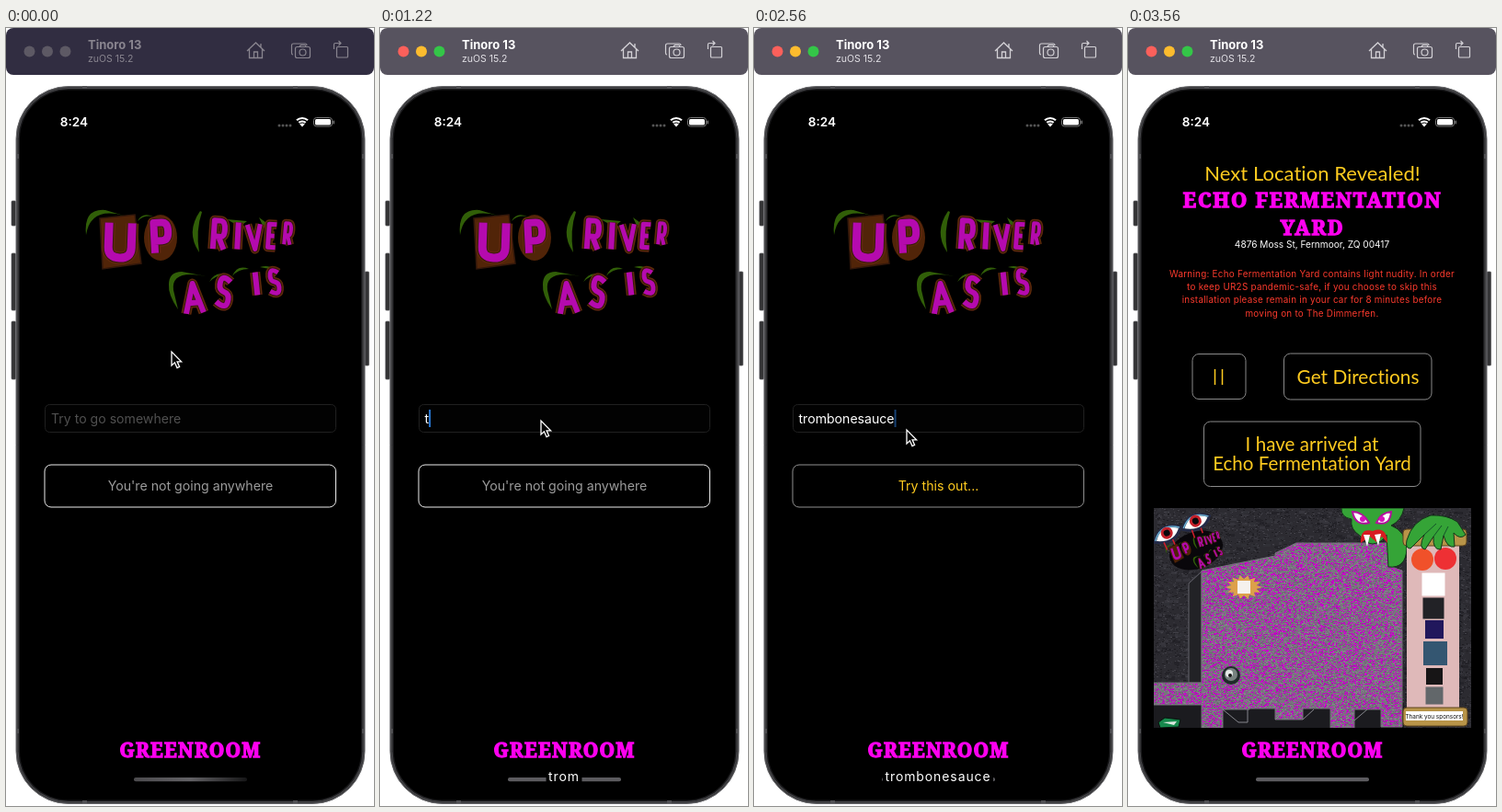
Animation of 400x846 px, one loop 4830 ms. Source, as an HTML page with a canvas:

```html
<!DOCTYPE html>
<html lang="en">
<head>
<meta charset="utf-8">
<title>Phone simulator</title>
<style>
  html, body { margin: 0; width: 100%; height: 100%; overflow: hidden; background: #fff; }
  canvas { display: block; width: 400px; height: 846px; }
</style>
</head>
<body>
<canvas id="stage"></canvas>
<script>
const W = 400, H = 846, LOOP = 4830, FPS = 9;
const SANS = 'Inter, sans-serif', SOFT = 'Lato, sans-serif', DECO = '"Noto Serif", serif';
const MAGENTA = '#ff00f0', GOLD = '#ffcb1f', GREEN = '#35a437';
const WORD = 'trombonesauce';
const dpr = window.devicePixelRatio || 1;

function makeLayer(canvas, w, h) {
  canvas.width = w * dpr;
  canvas.height = h * dpr;
  const g = canvas.getContext('2d');
  g.scale(dpr, dpr);
  return g;
}
const stage = makeLayer(document.getElementById('stage'), W, H);
let c = stage;

// ---------- helpers ----------
function seeded(seed) {
  return () => (seed = (seed * 16807) % 2147483647) / 2147483647;
}
function box(x, y, w, h, r, fill, stroke, lw = 1) {
  c.beginPath();
  c.roundRect(x, y, w, h, r);
  paint(fill, stroke, lw);
}
function disc(x, y, r, fill, ry = r, rot = 0) {
  c.beginPath();
  c.ellipse(x, y, r, ry, rot, 0, 7);
  paint(fill);
}
function shape(d, fill, stroke, lw) {
  paint(fill, stroke, lw, new Path2D(d));
}
function paint(fill, stroke, lw = 1, path) {
  if (fill) { c.fillStyle = fill; path ? c.fill(path) : c.fill(); }
  if (stroke) {
    c.strokeStyle = stroke;
    c.lineWidth = lw;
    path ? c.stroke(path) : c.stroke();
  }
}
function text(s, x, y, font, color, align = 'center', spacing = 0) {
  c.font = font;
  c.letterSpacing = spacing + 'px';
  c.textAlign = align;
  c.fillStyle = color;
  c.fillText(s, x, y);
  return c.measureText(s).width;
}
// slight spacing keeps letters apart instead of joined as ligatures
function soft(s, x, y, size) {
  text(s, x, y, size + 'px ' + SOFT, GOLD, 'center', .05);
}
function deco(s, y, size, spacing) {
  text(s, 200.5, y, '900 ' + size + 'px ' + DECO, MAGENTA, 'center', spacing);
  c.strokeStyle = MAGENTA;
  c.lineWidth = 1.3;
  c.lineJoin = 'miter';
  c.strokeText(s, 200.5, y);
}
function faded(alpha, draw) {
  c.save();
  c.globalAlpha = alpha;
  draw();
  c.restore();
}

// ---------- hand-cut title ----------
const GLYPH = {
  U: 'M0 0V7Q0 10 5 10T10 7V0',
  P: 'M1 10V0H6Q10 0 10 3T6 6H1',
  R: 'M1 10V0H6Q10 0 10 3T6 5.5H1M5 5.5L10 10',
  I: 'M5 0V10',
  V: 'M0 0L5 10L10 0',
  E: 'M10 0H1V10H10M1 5H8',
  A: 'M0 10L5 0L10 10M2 6.5H8',
  S: 'M9 1Q1 -2 1 2.5Q1 4.5 5 5T9 7.5Q9 12 0 9'
};
// letter, centre, size, tilt, stroke
const TITLE = [
  ['U', 124, 231, 25, 38, 2, 9], ['P', 168, 228, 17, 33, -3, 8],
  ['R', 231, 225, 13, 31, 4, 6], ['I', 252, 226, 10, 29, 3, 6],
  ['V', 270, 227, 14, 27, -3, 5], ['E', 289, 226, 9, 25, 4, 5],
  ['R', 306, 224, 7, 23, 5, 4], ['A', 204, 294, 19, 32, -5, 6],
  ['S', 237, 287, 14, 29, 8, 6], ['I', 272, 278, 8, 25, -6, 6],
  ['S', 292, 276, 11, 24, -5, 5]
];
const LEAVES = 'M87 225Q84 196 108 198L128 204Q92 194 87 225Z' +
  'M143 210Q148 200 160 205Q150 203 143 210ZM211 199Q195 222 210 244Q206 220 213 200Z' +
  'M240 208L262 210L254 216ZM275 206L286 214L280 217Z' +
  'M177 279Q177 265 191 265L218 270Q179 262 182 285L187 306Q176 290 177 279Z' +
  'M221 276Q227 265 238 268Q228 269 221 276ZM246 270Q251 257 264 262Q252 262 246 270Z' +
  'M276 260Q286 257 292 263Z';

function title() {
  shape(LEAVES, '#315f08');
  shape('M102 207L140 203L147 256L105 262Z', '#512408', '#32170a', 1.5);
  disc(168, 228, 18, '#512408', 25);
  c.lineJoin = 'round';
  for (const [ch, x, y, w, h, tilt, lw] of TITLE) {
    const p = new Path2D();
    const m = new DOMMatrix().translate(x, y).rotate(tilt).scale(w / 10, h / 10).translate(-5, -5);
    p.addPath(new Path2D(GLYPH[ch]), m);
    paint(null, '#5f290c', lw + 5, p);
    paint(null, '#35190a', lw + 2, p);
    paint(null, '#b50aae', lw, p);
  }
}

// ---------- map picture ----------
function speckle(rand, n, x, y, w, h, colors, size = 1) {
  for (let i = 0; i < n; i++) {
    c.fillStyle = colors[Math.floor(rand() * colors.length)];
    c.fillRect(Math.floor(x + rand() * w), Math.floor(y + rand() * h),
      size + Math.floor(rand() * 2 * size), size);
  }
}
function eye(x, y, rot) {
  c.save();
  c.translate(x, y);
  c.rotate(rot);
  shape('M-16 2Q-3 -17 16 -2Q4 14 -16 2Z', '#fff', '#242b48', 3);
  shape('M-15 1Q-2 -15 15 -2', null, '#6aaed0', 1.5);
  disc(0, -2, 6.5, '#c5202a');
  disc(0, -2, 3.5, '#08080c');
  shape('M-7 6V15M3 7V13', null, '#d31f2b', 1.5);
  c.restore();
}
function monster() {
  shape('M232 522Q231 532 243 534Q241 545 252 552Q259 561 266 561Q276 560 281 551L283 586Q302 588 303 566Q302 547 286 541Q297 536 300 522Z', GREEN, '#14351a', 1);
  shape('M244 526Q255 526 262 538Q247 542 244 526ZM270 538Q275 527 286 526Q285 542 270 538Z', '#fff', '#b40f9d', 2);
  disc(255, 534, 3, '#d512bb');
  disc(276, 534, 3, '#d512bb');
  shape('M253 560Q252 543 266 547Q281 541 282 560L276 553L270 559L263 553Z', '#d81b21');
  shape('M256 551L260 564L263 551ZM268 551L272 563L275 550Z', '#fff');
}
function claws() {
  shape('M303 557Q309 536 329 530Q346 529 358 537L367 551Q361 557 354 549L355 564Q347 566 343 552L340 567Q331 568 332 553L323 567Q315 566 322 551L307 566Q301 566 303 557Z', GREEN, '#14351a', 1);
  shape('M322 551L335 539M332 553L341 541M343 552L348 542', null, '#14532a', 1);
}
function sponsors() {
  box(303, 560, 57, 185, 0, '#dfb9b9');
  box(299, 545, 69, 18, 4, '#b89448', '#5d451d');
  box(299, 739, 70, 20, 4, '#b89448', '#5d451d');
  disc(320, 578, 12, '#f0512a');
  disc(345, 577, 12, '#ee3034');
  // centre x, centre y, side, colour
  [[332, 605, 25, '#fff'], [332, 631, 23, '#222226'], [333, 654, 20, '#21175c'],
   [334, 680, 26, '#345671'], [333, 705, 18, '#171516'], [333, 726, 19, '#62676a']]
    .forEach(([x, y, s, color]) => box(x - s / 2, y - s / 2, s, s, 0, color));
  box(302, 743, 62, 10, 0, '#fff');
  text('Thank you sponsors!', 333, 750.5, '6.4px ' + SANS, '#111');
}
function drawMap() {
  const rand = seeded(4127);
  c.beginPath();
  c.rect(28, 522, 345, 239);
  c.clip();
  box(28, 522, 345, 239, 0, '#2c2b31');
  speckle(rand, 1500, 28, 522, 345, 239, ['#242329', '#36353c', '#303036'], 3);
  speckle(rand, 9000, 28, 522, 345, 239, ['#222126', '#34333a', '#424148', '#1d1c21']);
  box(28, 735, 272, 26, 0, '#1b1b1f');
  shape('M66 712V604L80 591V712Z', '#222226', '#65656d', 1);

  const land = new Path2D('M80 590L160 574V571L183 560H284V585L298 590V760H275V741H246V761H220V740H190V752H160V740H132V741H103V761H80V736H28V712H80Z');
  c.save();
  c.clip(land);
  box(28, 555, 275, 206, 0, '#77747d');
  speckle(rand, 36000, 28, 555, 275, 206,
    ['#c006c4', '#cb0acb', '#b30cb8', '#7c7982', '#6a6871', '#85828b']);
  c.restore();
  paint(null, '#74717b', 1, land);
  shape('M103 741L120 755H130V741M160 752L172 740M190 752L202 741M220 752L232 741M246 753L260 741', null, '#85858c', 1);

  disc(74, 568, 30, '#09070b', 20, -.35);
  c.save();
  c.translate(74, 570);
  c.rotate(-.35);
  c.scale(.27, .32);
  c.translate(-200, -252);
  title();
  c.restore();
  eye(43, 551, -.42);
  eye(74, 538, -.35);

  c.beginPath();
  for (let i = 0; i < 28; i++) {
    const a = i * Math.PI / 14, r = i % 2 ? .7 : 1;
    c.lineTo(126 + Math.cos(a) * 20 * r, 608 + Math.sin(a) * 13 * r);
  }
  c.closePath();
  paint('#dda04a');
  box(119, 601, 14, 14, 0, '#f5f1ed');
  disc(112, 704, 10, '#202a2a');
  disc(112, 703, 7, '#77827f');
  disc(110, 702, 4, '#e5e9e7');
  disc(111, 704, 2, '#111');
  shape('M33 755L40 750L57 752L55 760L35 761Z', '#16884c', '#07130c', 1);
  shape('M38 755L53 754L50 758Z', '#dce8df');
  monster();
  sponsors();
  claws();
}
const mapCanvas = document.createElement('canvas');
c = makeLayer(mapCanvas, W, H);
drawMap();
c = stage;

// ---------- simulator window ----------
function titleBar(active) {
  box(0, 0, W, 51, 8, active ? '#57535f' : '#312d41');
  const ink = active ? '#d3d1d6' : '#89858f';
  ['#fc605b', '#fdbc2e', '#34c648'].forEach((color, i) =>
    disc(25.5 + i * 19.5, 25.5, 6, active ? color : '#5d5964'));
  text('Tinoro 13', 89, 23, '700 13px ' + SANS, active ? '#fff' : ink, 'left');
  text('zuOS 15.2', 89, 37, '10.5px ' + SANS, active ? '#e1dfe4' : ink, 'left');
  shape('M262 25L271.5 16L281 25M264.5 23V32.5H278.5V23M269.5 32V26H273.5V32M277 17V21', null, ink, 1.3);
  box(314.5, 20.5, 16, 12, 2, null, ink, 1.2);
  shape('M312 29Q310.5 29 310.5 27V19Q310.5 17 312.5 17H325Q327 17 327 19M319 20L320.5 18.5H325L326 20', null, ink, 1.2);
  c.beginPath();
  c.arc(322.5, 26.5, 3.5, 0, 7);
  paint(null, ink, 1.2);
  box(359.5, 20.5, 12, 11.5, 1, null, ink, 1.2);
  shape('M356.5 23V18Q356.5 16.5 358 16.5H364M361.5 14L364 16.5L361.5 19', null, ink, 1.2);
}
function phone() {
  [[6, 188, 27], [6, 245, 62], [6, 319, 63], [390, 265, 102]].forEach(([x, y, h]) =>
    box(x, y, 4.5, h, 1, '#343436', '#58585b', .7));
  box(11, 63.5, 379, 780, 57, '#3a3a3c', '#6b6b6e', 1);
  box(13, 65.5, 375, 776, 55, '#1a1a1c', '#48484b', 1);
  box(15, 67.5, 371, 772, 53, '#000');
  c.fillStyle = '#515154';
  [[83, 63], [312, 63], [83, 840], [312, 840]].forEach(([x, y]) => c.fillRect(x, y, 5, 3));
  [[11, 137], [387, 137], [11, 762], [387, 762]].forEach(([x, y]) => c.fillRect(x, y, 3, 5));
}
function statusBar() {
  text('8:24', 74, 107, '600 13.6px ' + SANS, '#fff');
  for (let i = 0; i < 4; i++) disc(297 + i * 4, 106, 1.5, '#555');
  c.lineCap = 'butt';
  [10, 6.5].forEach(r => {
    c.beginPath();
    c.arc(322, 107, r - 1, -2.3, -.84);
    paint(null, '#fff', 2.2);
  });
  shape('M322 107.5L319.2 104.6Q322 102.4 324.8 104.6Z', '#fff');
  box(334.5, 97.5, 20, 9.5, 3, null, '#777');
  box(336, 99, 17, 6.5, 1.5, '#fff');
  box(355.5, 100.5, 1.5, 4, 1, '#777');
}
function homeBar(solid) {
  let fill = '#5c5b5f';
  if (!solid) {
    fill = c.createLinearGradient(139, 0, 262, 0);
    fill.addColorStop(0, '#4c4b4e');
    fill.addColorStop(.5, '#626165');
    fill.addColorStop(1, '#161617');
  }
  box(139, 815, 123, 4.2, 2, fill);
}
function keyEcho(n) {
  if (!n) return;
  const font = '14px ' + SANS, s = WORD.slice(0, n);
  c.font = font;
  c.letterSpacing = '.9px';
  const w = c.measureText(s).width + 5;
  box(200 - w / 2, 806, w, 16, 0, '#000');
  text(s, 200, 818.5, font, '#fff', 'center', .9);
}
function pointer(x, y) {
  c.save();
  c.translate(x, y);
  c.lineJoin = 'miter';
  shape('M0 0V15L3.4 11.8L6 17.6L8.6 16.4L6.1 10.8H10.6Z', '#000', '#fff', 1.3);
  c.restore();
}

// ---------- screens ----------
function searchScreen(k, typed) {
  title();
  box(42.5, 409.5, 316, 30, 5, '#020202', '#202020');
  let caretX = 48;
  if (typed) caretX = 48.5 + text(WORD.slice(0, typed), 48.5, 430, '14.1px ' + SANS, '#fff', 'left');
  else text('Try to go somewhere', 49, 430, '14.1px ' + SANS, '#505050', 'left');
  if (k >= 7) {
    faded(k === 23 ? .55 : 1, () => box(caretX, 415, 2, 19, 0, '#2877d2'));
  }
  const ready = k >= 20;
  faded(k === 28 ? .4 : 1, () => {
    box(42, 475, 316.5, 46, 7, null, ready ? '#909090' : '#ececec');
    if (ready) text('Try this out...', 200.5, 503, '14.2px ' + SANS, GOLD);
    else text("You're not going anywhere", 200.5, 503, '14.15px ' + SANS, '#9b9b9b');
  });
}
function placeScreen() {
  soft('Next Location Revealed!', 200.5, 166, 22);
  deco('ECHO FERMENTATION', 195, 22, 1.7);
  deco('YARD', 225, 22, 1.7);
  text('4876 Moss St, Fernmoor, ZQ 00417', 200, 239, '10.1px ' + SANS, '#fff');
  ['Warning: Echo Fermentation Yard contains light nudity. In order',
   'to keep UR2S pandemic-safe, if you choose to skip this',
   'installation please remain in your car for 8 minutes before',
   'moving on to The Dimmerfen.']
    .forEach((line, i) => text(line, 200, 271 + i * 14.2, '9.9px ' + SANS, '#fb3a2d', 'center', .25));
  box(70, 354.5, 58, 49, 7, null, '#8a8a8a');
  box(169.5, 354, 160.5, 50, 7, null, '#8a8a8a');
  box(82.5, 428, 235.5, 70.5, 7, null, '#8a8a8a');
  shape('M94.5 371V388M102.5 371V388', null, GOLD, 1.5);
  soft('Get Directions', 250, 387, 20.8);
  soft('I have arrived at', 200, 460, 20.5);
  soft('Echo Fermentation Yard', 200, 481, 20.5);
  c.drawImage(mapCanvas, 0, 0, W, H);
}

const ECHO = [1, 2, 3, 4, 5, 5, 6, 7, 10, 11, 12, 13];
const TYPED = [0, 0, 0, 1, 3, 4, 5, 6, 8, 10, 12, 13];
const PATH = [[1, 180, 352], [5, 175, 427], [17, 175, 427], [20, 166, 437], [23, 166, 437],
  [26, 167, 482], [28, 167, 482], [29, 21, 488], [30, 40, 250], [31, 70, 20]];
const TAPS = [[6, 176, 425], [28, 167.5, 482.5]];

const count = (list, k) => k < 8 ? 0 : list[Math.min(k - 8, list.length - 1)];

function pointerAt(k) {
  const i = PATH.findIndex(p => p[0] >= k);
  const b = PATH[i], a = PATH[Math.max(0, i - 1)];
  const u = b === a ? 1 : (k - a[0]) / (b[0] - a[0]);
  const e = u * u * (3 - 2 * u);
  return [a[1] + (b[1] - a[1]) * e, a[2] + (b[2] - a[2]) * e];
}

function render(k) {
  box(0, 0, W, H, 0, '#fff');
  titleBar(k >= 6);
  phone();
  statusBar();
  if (k < 29) searchScreen(k, count(TYPED, k));
  else placeScreen();
  deco('GREENROOM', 793, 21, 1.3);
  homeBar(k >= 3);
  if (k < 32) keyEcho(count(ECHO, k));
  for (const [at, x, y] of TAPS) {
    if (k === at) disc(x, y, 13, '#f00000');
    if (k === at + 1) disc(x, y, 6.5, '#f00000');
  }
  if (k < 32) pointer(...pointerAt(k));
}

const start = performance.now();
function tick() {
  const t = (performance.now() - start) % LOOP;
  render(Math.floor((t + 5) * FPS / 1000));
  requestAnimationFrame(tick);
}
tick();
</script>
</body>
</html>
```
